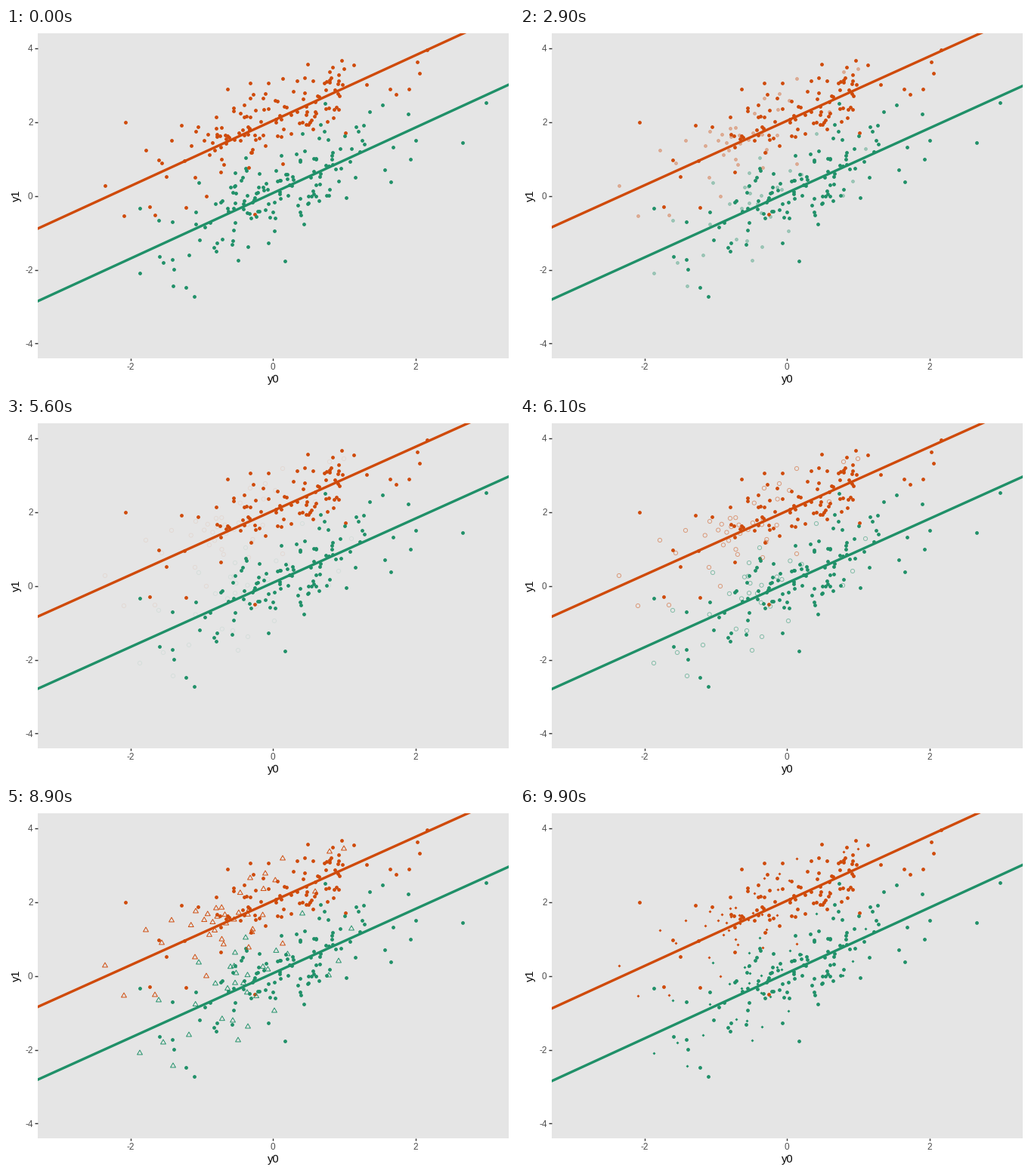
Write a matplotlib script that moves like this. It is 672 px wide and 480 px high and loops after 10 s.

```python
import numpy as np
import matplotlib.pyplot as plt
from matplotlib.animation import FuncAnimation
from matplotlib.collections import PathCollection
from matplotlib.patches import Rectangle
from matplotlib.path import Path
from matplotlib.transforms import IdentityTransform

W, H, DPI = 672, 480, 96
PT = 72 / DPI                       # points per pixel
LEFT, TOP, RIGHT, BOTTOM = 42, 7.3, 664.7, 437.6
CX, CY, UX, UY = 353.3, 222.6, 94.35, 48.95
ORANGE, GREEN = "#CF4A0A", "#1F9068"
STROKE = 0.945
STEPS = 12
FADE_OUT, FADE_IN, REFILL = 21, 55, 88   # last still frame before each change

# Outlying points in pixels; the dense middle of each cloud is drawn at random.
ORANGE_KEPT = [
    (158, 125), (190, 237), (238, 238), (329, 247), (293, 81), (323, 73),
    (347, 73), (399, 48), (444, 43), (460, 49), (544, 45), (547, 60),
    (508, 81), (516, 88), (533, 81), (557, 29), (212, 197), (202, 175),
    (232, 129), (477, 75), (449, 139)]
GREEN_KEPT = [
    (635, 99), (604, 152), (532, 114), (542, 149), (535, 174), (498, 102),
    (481, 111), (501, 188), (509, 204), (369, 309), (249, 356), (238, 344),
    (222, 320), (203, 303), (177, 239), (220, 307), (220, 257), (347, 285),
    (512, 158), (394, 260), (450, 225), (422, 100)]
ORANGE_LOST = [
    (131, 209), (156, 249), (197, 248), (185, 162), (206, 179), (250, 198),
    (265, 223), (251, 137), (321, 185), (366, 180), (366, 67), (428, 58),
    (447, 54), (323, 93), (219, 149), (278, 133), (343, 87), (409, 111)]
GREEN_LOST = [
    (177, 325), (202, 255), (208, 311), (221, 342), (242, 301), (300, 282),
    (307, 308), (255, 205), (317, 172), (303, 192), (392, 140), (457, 160),
    (427, 222), (440, 203), (355, 269), (320, 290)]

rng = np.random.default_rng(12)


def cloud(points, n, xs, mid, slope, spread):
    """Fixed points plus n random ones scattered about a slope."""
    x = rng.triangular(*xs, n)
    y = mid - slope * (x - 350) + rng.triangular(-spread, 0, spread, n)
    return np.vstack([points, np.column_stack([x, y])])


def poly(*pts, closed=True):
    pts = list(pts) + [pts[0]] if closed else list(pts)
    codes = [Path.MOVETO] + [Path.LINETO] * (len(pts) - 1)
    if closed:
        codes[-1] = Path.CLOSEPOLY
    return Path(pts, codes)


def symbol(code, size):
    """Plot symbol by its number; returns its path and whether it is filled."""
    r = 0.375 * (size * 2.845 + STROKE) / PT
    ring = Path.circle((0, 0), r)
    box = poly((-r, -r), (r, -r), (r, r), (-r, r))

    def tri(s):
        return poly((0, s * 1.555 * r), (1.347 * r, -s * 0.778 * r),
                    (-1.347 * r, -s * 0.778 * r))

    def plus(a):
        return [poly((-a, 0), (a, 0), closed=False),
                poly((0, -a), (0, a), closed=False)]

    cross = [poly((-r, -r), (r, r), closed=False),
             poly((-r, r), (r, -r), closed=False)]
    parts = {
        1: [ring],
        2: [tri(1)],
        4: cross,
        6: [tri(-1)],
        7: [box] + cross,
        8: cross + plus(r * 2 ** 0.5),
        10: [ring] + plus(r),
        12: [box] + plus(r),
        13: [ring] + cross,
        14: [box, poly((-r, -r), (0, r), (r, -r), closed=False)],
        16: [ring],
        18: [poly((-r, 0), (0, r), (r, 0), (0, -r))],
        19: [ring],
    }[code]
    path = parts[0] if len(parts) == 1 else Path.make_compound_path(*parts)
    return path, code >= 15


fig = plt.figure(figsize=(W / DPI, H / DPI), dpi=DPI, facecolor="white")
ax = fig.add_axes([0, 0, 1, 1])
ax.set_xlim(0, W)
ax.set_ylim(H, 0)
ax.axis("off")
panel = ax.add_patch(Rectangle((LEFT, TOP), RIGHT - LEFT, BOTTOM - TOP,
                               fc="#E5E5E5", lw=0, zorder=0))


def label(x, y, s, px, color, **kw):
    ax.text(x, y, s, fontsize=px * PT, color=color, family="Liberation Sans",
            va="baseline", rotation_mode="anchor", **kw)


def tick(xs, ys):
    ax.plot(xs, ys, color="#333333", lw=1.42 * PT, solid_capstyle="butt")


for v in (-2, 0, 2):
    x = CX + v * UX
    tick([x, x], [BOTTOM, BOTTOM + 3.7])
    label(x, 453, str(v), 11.73, "#4D4D4D", ha="center")
for v in (-4, -2, 0, 2, 4):
    y = CY - v * UY
    tick([LEFT - 3.7, LEFT], [y, y])
    label(35.6, y + 4.2, str(v), 11.73, "#4D4D4D", ha="right")
label(CX, 470, "y0", 14.67, "black", ha="center")
label(17.8, CY, "y1", 14.67, "black", ha="center", rotation=90)


def dots(points, color):
    path, _ = symbol(19, 1)
    c = PathCollection([path], sizes=[PT ** 2], offsets=points,
                       offset_transform=ax.transData, facecolors=color,
                       edgecolors=color, linewidths=STROKE * PT, zorder=2)
    c.set_transform(IdentityTransform())
    ax.add_collection(c, autolim=False)
    c.set_clip_path(panel)
    return c


dots(cloud(ORANGE_KEPT, 86, (225, 400, 470), 124, 0.36, 48), ORANGE)
dots(cloud(GREEN_KEPT, 104, (235, 370, 485), 217, 0.46, 62), GREEN)
lost = [
    dots(cloud(ORANGE_LOST, 22, (222, 300, 400), 128, 0.36, 36), ORANGE),
    dots(cloud(GREEN_LOST, 16, (232, 320, 410), 215, 0.46, 46), GREEN)]


def fit_line(color):
    line, = ax.plot([], [], color=color, lw=3.4 * PT, zorder=3)
    line.set_clip_path(panel)
    return line


fits = [fit_line(GREEN), fit_line(ORANGE)]

# Height of each line at the panel's left and right edge: green, then orange.
FULL = np.array([[362.2, 75.3], [266.0, -20.4]])
DROPPED = np.array([[358.9, 77.7], [263.3, -17.2]])
IMPUTED = np.array([[360.0, 78.3], [263.5, -16.9]])


def step(i, start):
    return min(max(i - start, 0), STEPS)


def draw(i):
    out, back, fill = (step(i, s) for s in (FADE_OUT, FADE_IN, REFILL))
    ends = (FULL + (DROPPED - FULL) * out / STEPS
            + (IMPUTED - DROPPED) * back / STEPS
            + (FULL - IMPUTED) * fill / STEPS)
    for line, ys in zip(fits, ends):
        line.set_data([LEFT, RIGHT], ys)

    if back == 0:
        code, size, alpha = 19, 1, 1 - out / STEPS
    else:
        code = round(1 + 1.5 * fill)      # symbol number runs from 1 to 19
        size, alpha = 1.5 - 0.5 * fill / STEPS, back / STEPS
    path, solid = symbol(code, size)
    for c, color in zip(lost, (ORANGE, GREEN)):
        c.set_paths([path])
        c.set_edgecolor((color, alpha))
        c.set_facecolor((color, alpha) if solid else "none")
        c.set_linewidth(0 if code == 18 else STROKE * PT)
    return fits + lost


anim = FuncAnimation(fig, draw, frames=100, interval=100, repeat=True)
plt.show()
```
